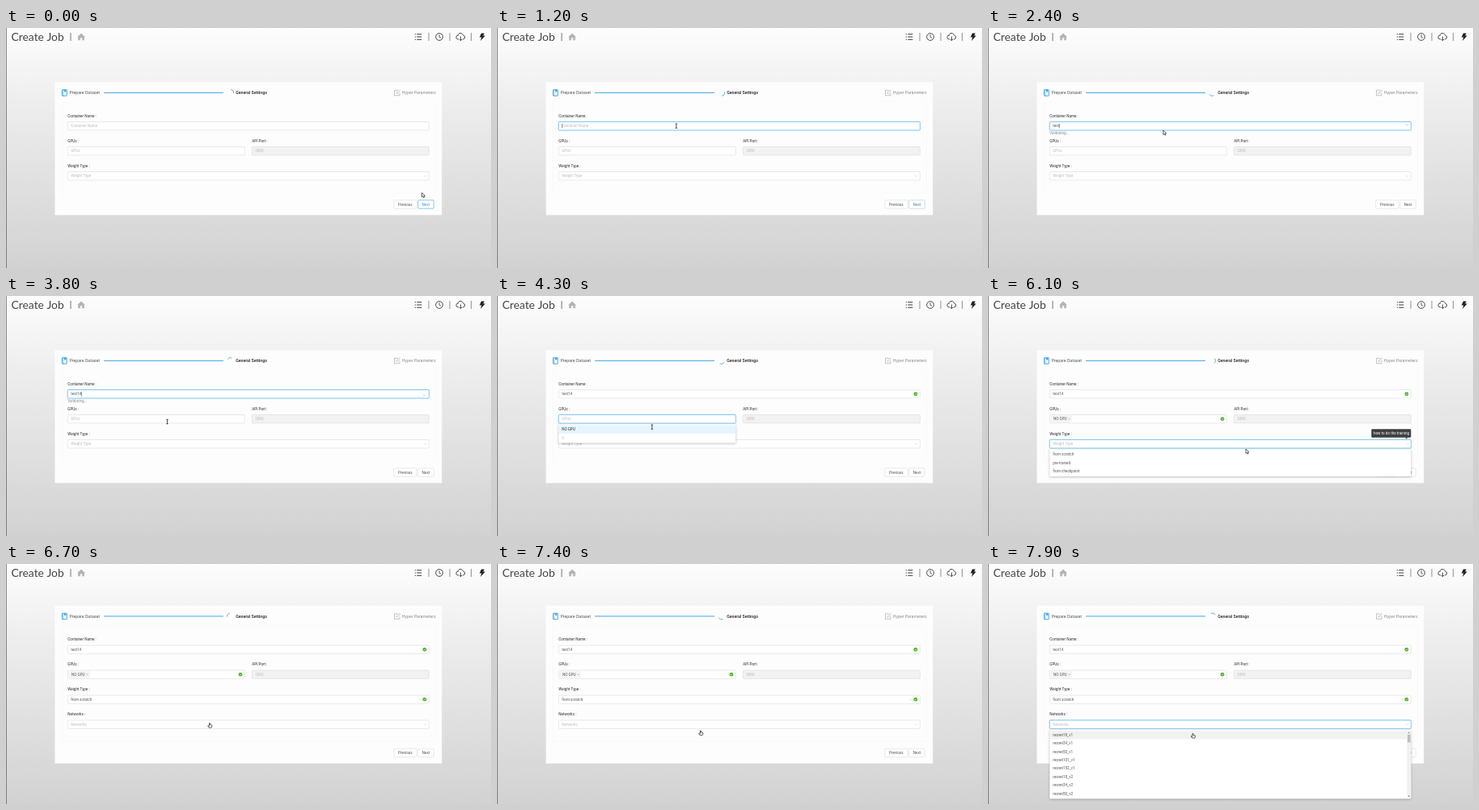
Recreate the animation shown at these times as an HTML page with a canvas. Size 600x298 px, loop 8000 ms.

```html
<!DOCTYPE html>
<html lang="en">
<head>
<meta charset="utf-8">
<title>Create Job</title>
<style>
  html, body { margin: 0; width: 100%; height: 100%; overflow: hidden; background: #eee; }
  canvas { display: block; width: 600px; height: 298px; }
</style>
</head>
<body>
<canvas id="stage"></canvas>
<script>
const W = 600, H = 298, LOOP = 8000, STEP = 100;
const BLUE = '#2f9be3', FOCUS = '#4fb0f2', GREEN = '#46b81f';
const DARK = '#2b2b2b', BODY = '#555', HINT = '#bdbdbd', EDGE = '#dadada';
const SMALL = 4.58, STEP_SIZE = 5.24;
const ROW = 31, BOX_H = 10.4, LEFT = 76.3, FULL = 447, HALF = 219, RIGHT_X = 304.3;
const TAU = Math.PI * 2;

const canvas = document.getElementById('stage');
const dpr = window.devicePixelRatio || 1;
canvas.width = W * dpr;
canvas.height = H * dpr;
const c = canvas.getContext('2d');

// Moments of the session, in ms
const AT = {
  focusName: 1000, validate: 2000, nameOk: 4100,
  gpuOpen: 3900, gpuPick: 4700, gpuClose: 5500,
  weightOpen: 5700, weightPick: 6500, grow: 6600, netOpen: 7600
};
const KEYS = [[1900, 't'], [2000, 'e'], [2200, 's'], [2300, 't'], [2900, '1'], [3200, '4']];
// time, x, y, pointer shape from then on
const PATH = [
  [0, 514.5, 204.5, 'arrow'], [100, 514, 204, 'arrow'], [500, 385, 165, 'arrow'],
  [800, 232, 123, 'text'], [1100, 222, 121.5, 'text'], [1900, 218, 124, 'text'],
  [2200, 216.8, 127, 'arrow'], [2700, 216.8, 127, 'arrow'], [3200, 208, 211, 'arrow'],
  [3600, 199.5, 158, 'text'], [3800, 199.5, 156, 'text'], [4100, 197, 156, 'text'],
  [4400, 190, 165, 'hand'], [4700, 190, 165, 'hand'], [4900, 262, 190, 'arrow'],
  [5100, 320, 202, 'arrow'], [5400, 320, 202, 'arrow'], [5600, 319, 184, 'arrow'],
  [5900, 319, 185, 'arrow'], [6100, 319, 190, 'arrow'], [6300, 280, 196, 'hand'],
  [6600, 252, 196.5, 'hand'], [7100, 252, 207, 'hand'], [7400, 252, 207, 'hand'],
  [7600, 253, 200, 'hand'], [7900, 253.5, 210.5, 'hand'], [8000, 253.5, 210.5, 'hand']
];

const clamp = v => Math.max(0, Math.min(1, v));
const ramp = (t, from, span) => clamp((t - from) / span);

function text(str, x, y, { size = SMALL, color = BODY, weight = 400, align = 'left', font = 'Roboto' } = {}) {
  c.font = `${weight} ${size}px ${font}, sans-serif`;
  c.textAlign = align;
  c.fillStyle = color;
  c.fillText(str, x, y + size * 0.355);
}

function rect(x, y, w, h, fill, stroke, r = 1.2, line = 0.6) {
  c.beginPath();
  c.roundRect(x, y, w, h, r);
  if (fill) { c.fillStyle = fill; c.fill(); }
  if (stroke) { c.strokeStyle = stroke; c.lineWidth = line; c.stroke(); }
}

function line(points, color, width = 0.6, close = false) {
  c.beginPath();
  points.forEach(([x, y], i) => i ? c.lineTo(x, y) : c.moveTo(x, y));
  if (close) c.closePath();
  c.strokeStyle = color;
  c.lineWidth = width;
  c.stroke();
}

function poly(points, color) {
  c.beginPath();
  points.forEach(([x, y]) => c.lineTo(x, y));
  c.closePath();
  c.fillStyle = color;
  c.fill();
}

function spinner(x, y, r, mid, width) {
  c.beginPath();
  c.arc(x, y, r, mid - TAU / 8, mid + TAU / 8);
  c.strokeStyle = BLUE;
  c.lineWidth = width;
  c.stroke();
}

function okMark(x, y) {
  c.beginPath();
  c.arc(x, y, 2.4, 0, TAU);
  c.fillStyle = GREEN;
  c.fill();
  line([[x - 1.1, y], [x - 0.3, y + 0.9], [x + 1.2, y - 0.9]], '#fff', 0.6);
}

const chevron = (x, y) => line([[x - 1.5, y - 0.7], [x, y + 0.8], [x + 1.5, y - 0.7]], '#c4c4c4', 0.5);

function background() {
  const g = c.createLinearGradient(0, 0, 0, H);
  g.addColorStop(0, '#fdfdfd');
  g.addColorStop(0.08, '#f9f9f9');
  g.addColorStop(0.3, '#eeeeee');
  g.addColorStop(1, '#d2d2d2');
  c.fillStyle = g;
  c.fillRect(0, 0, W, H);
  c.fillStyle = 'rgba(60,60,60,.7)';
  c.fillRect(0, 0, 0.8, H);
}

function header() {
  const ink = '#3a3a3a';
  text('Create Job', 6.5, 11, { size: 13.9, color: '#444', font: 'Lato' });
  line([[80, 6], [80, 16]], '#555', 0.8);
  for (const x of [523, 549, 575.5]) line([[x, 6], [x, 16]], '#666', 0.7);

  poly([[93, 6.5], [98, 11.2], [96.8, 11.2], [96.8, 15.2], [94.2, 15.2], [94.2, 12.2],
    [91.8, 12.2], [91.8, 15.2], [89.2, 15.2], [89.2, 11.2], [88, 11.2]], '#b4b4b4');

  for (const y of [7.7, 11, 14.3]) {
    line([[508.2, y], [514.3, y]], ink, 1);
    line([[505.8, y], [507, y]], ink, 1);
  }

  c.beginPath();
  c.arc(536, 11, 4.4, 0, TAU);
  c.strokeStyle = ink;
  c.lineWidth = 0.9;
  c.stroke();
  line([[536, 8.2], [536, 11.2], [538, 12.3]], ink, 0.8);

  c.beginPath();
  c.moveTo(560, 14);
  c.arc(559.3, 11.5, 2.4, 1.7, -1.4);
  c.arc(562.4, 9.8, 3.3, -2.8, -0.3);
  c.arc(565.4, 11.6, 2.3, -1.4, 1.6);
  c.lineTo(564.6, 14);
  c.lineWidth = 0.9;
  c.stroke();
  line([[562.4, 10.5], [562.4, 15.5]], ink, 0.9);
  line([[560.8, 14], [562.4, 15.6], [564, 14]], ink, 0.9);

  poly([[588, 6.5], [591.8, 6.5], [590.3, 9.6], [592.8, 9.6], [587, 16], [588.3, 11.6], [585.8, 11.6]], '#222');
}

function steps(t) {
  const y = 80.4;
  rect(69.4, 76.7, 5.8, 7.5, '#fff', BLUE, 0.3, 0.9);
  line([[70.9, 76.7], [70.9, 84.2]], BLUE, 0.6);
  poly([[72.2, 76.7], [74.2, 76.7], [74.2, 79.8], [73.2, 79], [72.2, 79.8]], BLUE);
  text('Prepare Dataset', 78.5, y, { size: STEP_SIZE });
  line([[121, y], [269, y]], BLUE, 0.9);
  spinner(277.6, y, 3.9, TAU * (t / 1000 - 0.1), 0.8);
  text('General Settings', 284.2, y, { size: STEP_SIZE, color: '#222', weight: 500 });
  line([[484.5, 77.3], [480.5, 77.3], [480.5, 83.8], [487, 83.8], [487, 80.5]], '#aaa', 0.7);
  line([[483, 81.6], [483.2, 80], [486.4, 76.8], [487.6, 78], [484.4, 81.2]], '#aaa', 0.6, true);
  text('Hyper Parameters', 489.8, y, { size: STEP_SIZE, color: '#8a8a8a' });
}

// Labelled box; y is the middle of the box
function field(label, x, y, w, { hint, value, focus, off, arrow } = {}) {
  const top = y - BOX_H / 2;
  text(label + ' :', x, y - 12.8, { color: DARK });
  if (focus) rect(x, top, w, BOX_H, null, 'rgba(47,155,227,.22)', 1.4, 1.9);
  rect(x, top, w, BOX_H, off ? '#f2f2f2' : '#fff', focus ? FOCUS : EDGE);
  if (value) text(value, x + 3.9, y, { color: off ? HINT : BODY });
  else if (hint) text(hint, x + 3.9, y, { color: HINT });
  if (arrow) chevron(x + w - arrow, y);
}

function button(label, x, w, y, glow = 0) {
  rect(x, y - 5.2, w, BOX_H, '#fff', EDGE);
  text(label, x + w / 2, y, { align: 'center', color: BODY });
  if (glow <= 0) return;
  c.globalAlpha = glow;
  rect(x, y - 5.2, w, BOX_H, '#fff', FOCUS);
  text(label, x + w / 2, y, { align: 'center', color: BLUE });
  c.globalAlpha = 1;
}

// Sliding list below a box whose middle is y
function menu(y, w, items, open, paint) {
  if (open <= 0) return;
  const top = y + BOX_H / 2 + 1.3, h = items.length * BOX_H + 2.6;
  c.save();
  c.globalAlpha = open;
  c.translate(0, top);
  c.scale(1, 0.8 + 0.2 * open);
  c.shadowColor = 'rgba(0,0,0,.28)';
  c.shadowBlur = 3 * dpr;
  c.shadowOffsetY = 0.7 * dpr;
  rect(LEFT, 0, w, h, '#fff', null);
  c.shadowColor = 'transparent';
  items.forEach((name, i) => paint(name, 1.3 + BOX_H * i, i));
  c.restore();
}

const fade = (t, from, to) => ramp(t, from - 100, 200) * (1 - ramp(t, to, 200));

function nameField(t) {
  const y = 121.7;
  const focus = t >= AT.focusName && t < AT.gpuOpen;
  const value = KEYS.filter(k => t >= k[0]).map(k => k[1]).join('');
  field('Container Name', LEFT, y, FULL, { hint: 'Container Name', value, focus });
  if (focus) {
    const end = LEFT + 4.3 + (value ? c.measureText(value).width : 0);
    const since = t - (value ? KEYS.filter(k => t >= k[0]).pop()[0] : AT.focusName);
    if (since % 1000 < 700) line([[end, y - 2.8], [end, y + 2.8]], '#333', 0.5);
  }
  if (t >= AT.nameOk) okMark(517.8, y);
  else if (t >= AT.validate) {
    spinner(517.2, y, 1.8, TAU * (t / 1000 - 0.57), 0.5);
    text('Validating...', LEFT, 130.6, { color: '#8c8c8c' });
  }
}

function gpuField(t) {
  const y = 152.7, picked = t >= AT.gpuPick;
  field('GPUs', LEFT, y, HALF, { hint: picked ? '' : 'GPUs', focus: t >= AT.gpuOpen && t < AT.gpuClose });
  if (!picked) return;
  rect(78, y - 3.8, 25.3, 7.6, '#f5f5f5', '#e6e6e6', 0.8, 0.4);
  text('NO GPU', 81, y);
  line([[99.4, y - 1], [101.2, y + 0.8]], '#999', 0.45);
  line([[101.2, y - 1], [99.4, y + 0.8]], '#999', 0.45);
  okMark(290, y);
}

function gpuMenu(t) {
  const picked = t >= AT.gpuPick;
  menu(152.7, HALF, ['NO GPU', '0'], fade(t, AT.gpuOpen, AT.gpuClose), (name, y, i) => {
    const mid = y + BOX_H / 2;
    if (i === 0) {
      c.fillStyle = '#e6f5fd';
      c.fillRect(LEFT, y, HALF, BOX_H);
      if (picked) line([[287.6, mid], [289, mid + 1.4], [291.6, mid - 1.5]], BLUE, 0.7);
    }
    text(name, 80.2, mid, { color: i ? HINT : DARK, weight: i === 0 && picked ? 600 : 400 });
  });
}

function weightMenu(t) {
  const hover = t >= 6200 ? 0 : -1;
  menu(183.7, FULL, ['from scratch', 'pre-trained', 'from checkpoint'], fade(t, AT.weightOpen, AT.weightPick), (name, y, i) => {
    if (i === hover) { c.fillStyle = '#e9f6fd'; c.fillRect(LEFT, y, FULL, BOX_H); }
    text(name, 80.2, y + BOX_H / 2);
  });
}

function tooltip(t) {
  const shown = fade(t, 5800, 6300);
  if (shown <= 0) return;
  c.globalAlpha = shown;
  rect(474.3, 165.2, 49, 10.6, '#3f3f3f', null, 1.2);
  poly([[516, 175.7], [519.4, 175.7], [517.7, 177.6]], '#3f3f3f');
  text('how to do the training', 476.9, 170.5, { color: '#fff' });
  c.globalAlpha = 1;
}

function networkMenu(t) {
  const names = ['18_v1', '34_v1', '50_v1', '101_v1', '152_v1', '18_v2', '34_v2', '50_v2'];
  menu(183.7 + ROW, FULL, names, ramp(t, AT.netOpen - 100, 200), (name, y, i) => {
    if (i === 0) { c.fillStyle = '#f1f1f1'; c.fillRect(LEFT, y, FULL, BOX_H); }
    text('resnet' + name, 80.2, y + BOX_H / 2);
    if (i < names.length - 1) return;
    c.fillStyle = '#f1f1f1';
    c.fillRect(518.4, 1.3, 4.9, BOX_H * names.length);
    c.fillStyle = '#bfbfbf';
    c.fillRect(519, 6, 3.7, 9.8);
    poly([[519.6, 4.2], [522, 4.2], [520.8, 2.9]], '#777');
    poly([[519.6, 82], [522, 82], [520.8, 83.3]], '#444');
  });
}

function card(t) {
  const grown = t >= AT.grow, extra = grown ? ROW : 0;
  const buttonY = 219 + extra;
  c.save();
  c.translate(0, -extra / 2);
  rect(60.5, 67.3, 478.7, 165 + extra, '#fdfdfd', null, 0.6);
  rect(69.3, 92, 462, 113 + extra, null, '#f5f5f5', 0.6, 0.5);
  steps(t);
  nameField(t);
  gpuField(t);
  field('API Port', RIGHT_X, 152.7, HALF, { value: '3380', off: true });

  const picked = t >= AT.weightPick;
  field('Weight Type', LEFT, 183.7, FULL, {
    hint: 'Weight Type', value: picked ? 'from scratch' : '',
    focus: t >= AT.weightOpen && t < AT.grow, arrow: picked ? 11.2 : 5
  });
  if (picked) okMark(517.8, 183.7);
  if (grown) field('Networks', LEFT, 183.7 + ROW, FULL, { hint: 'Networks', focus: t >= AT.netOpen, arrow: 5 });

  button('Previous', 479.8, 28.2, buttonY);
  button('Next', 509.8, 19.4, buttonY, 1 - ramp(t, AT.focusName, 300));
  gpuMenu(t);
  weightMenu(t);
  tooltip(t);
  if (grown) networkMenu(t);
  c.restore();
}

const SHAPES = {
  arrow() {
    const p = [[0, 0], [0, 5.4], [1.3, 4.3], [2.2, 6.2], [3.1, 5.8], [2.3, 3.9], [3.9, 3.8]];
    poly(p, '#fff');
    line(p, '#222', 0.7, true);
  },
  text() {
    line([[-1.3, -2.7], [1.3, -2.7]], '#222', 0.7);
    line([[0, -2.7], [0, 2.7]], '#222', 0.8);
    line([[-1.3, 2.7], [1.3, 2.7]], '#222', 0.7);
  },
  hand() {
    const p = [[-0.5, 0], [0.4, 0], [0.6, 2], [2.8, 2.5], [2.8, 4.2], [2.1, 5.6], [-0.9, 5.6], [-2.4, 3.4], [-1.8, 2.9], [-0.6, 3.8]];
    poly(p, '#fff');
    line(p, '#222', 0.7, true);
  }
};

function pointer(t) {
  let i = 0;
  while (i < PATH.length - 2 && t >= PATH[i + 1][0]) i++;
  const [t0, x0, y0, shape] = PATH[i], [t1, x1, y1] = PATH[i + 1];
  const u = ramp(t, t0, t1 - t0), k = u * u * (3 - 2 * u);
  c.save();
  c.translate(x0 + (x1 - x0) * k, y0 + (y1 - y0) * k);
  SHAPES[shape]();
  c.restore();
}

function draw(now) {
  const t = Math.floor((now % LOOP) / STEP) * STEP;
  c.setTransform(dpr, 0, 0, dpr, 0, 0);
  background();
  header();
  card(t);
  pointer(t);
}

const start = performance.now();
function tick() {
  draw(performance.now() - start);
  requestAnimationFrame(tick);
}
tick();
</script>
</body>
</html>
```
